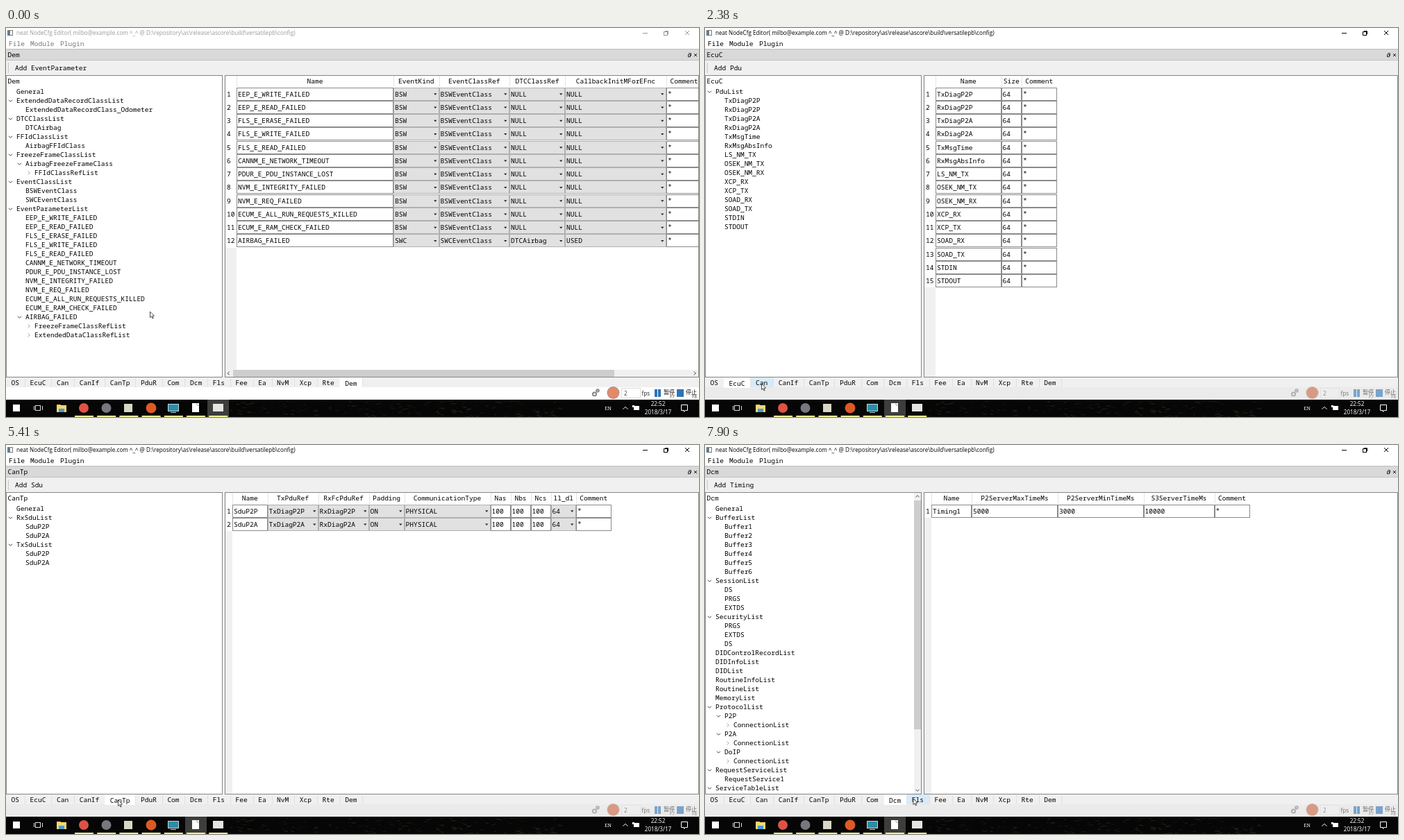
An HTML page with a canvas for the animation above (8 s loop, 998 by 561 pixels).

```html
<!DOCTYPE html>
<html>
<head>
<meta charset="utf-8">
<style>
  html, body { margin: 0; height: 100%; overflow: hidden; background: #fff; }
  canvas { display: block; }
</style>
</head>
<body>
<canvas id="stage" width="998" height="561"></canvas>
<script>
const g = document.getElementById('stage').getContext('2d');
const MONO = '500 9.55px "Noto Sans Mono", monospace';
const SANS = '8.15px "Open Sans", sans-serif';
const CJK = '8px "Noto Sans CJK SC", "Noto Sans CJK", sans-serif';
const TABS = 'OS EcuC Can CanIf CanTp PduR Com Dcm Fls Fee Ea NvM Xcp Rte Dem'.split(' ');
const CHAR = 5.73;
const ROW = 19.25;

const bswEvents = ('EEP_E_WRITE_FAILED EEP_E_READ_FAILED FLS_E_ERASE_FAILED FLS_E_WRITE_FAILED FLS_E_READ_FAILED ' +
  'CANNM_E_NETWORK_TIMEOUT PDUR_E_PDU_INSTANCE_LOST NVM_E_INTEGRITY_FAILED NVM_E_REQ_FAILED ' +
  'ECUM_E_ALL_RUN_REQUESTS_KILLED ECUM_E_RAM_CHECK_FAILED').split(' ');
const pdus = ('TxDiagP2P RxDiagP2P TxDiagP2A RxDiagP2A TxMsgTime RxMsgAbsInfo LS_NM_TX OSEK_NM_TX ' +
  'OSEK_NM_RX XCP_RX XCP_TX SOAD_RX SOAD_TX STDIN STDOUT').split(' ');
const routes = ['DcmP2P,Dcm,TxDiagP2P', 'CanTpP2P,CanTp,RxDiagP2P', 'DcmP2A,Dcm,TxDiagP2A', 'CanTpP2A,CanTp,RxDiagP2A',
  'ComMsgTime,Com,TxMsgTime', 'CanIfMsgAbs,CanIf,RxMsgAbsInfo', 'SOAD_RX,SoAdTp,SOAD_RX', 'SOAD_TX,Dcm,SOAD_TX'];

// Tree: leading spaces give depth, "-" is open, "+" is closed. Columns: name:width, "*" marks a combo box.
const PAGES = {
  Dem: {
    add: 'EventParameter', hscroll: true,
    tree: 'General|-ExtendedDataRecordClassList| ExtendedDataRecordClass_Odometer|-DTCClassList| DTCAirbag|' +
      '-FFIdClassList| AirbagFFIdClass|-FreezeFrameClassList| -AirbagFreezeFrameClass|  +FFIdClassRefList|' +
      '-EventClassList| BSWEventClass| SWCEventClass|-EventParameterList|' + bswEvents.map(e => ' ' + e).join('|') +
      '| -AIRBAG_FAILED|  +FreezeFrameClassRefList|  +ExtendedDataClassRefList',
    cols: 'Name:226 EventKind:65.5* EventClassRef:101.5* DTCClassRef:80* CallbackInitMForEFnc:146* Comment:51',
    rows: [...bswEvents.map(e => e + ',BSW,BSWEventClass,NULL,NULL'), 'AIRBAG_FAILED,SWC,SWCEventClass,DTCAirbag,USED']
  },
  OS: {
    add: 'Resource',
    tree: 'General|-ApplicationModeList| OSDEFAULTAPPMODE|-ApplicationList| OsDefaultApp|-TaskList| SchM_Startup|' +
      ' SchM_BswService| -Task3|  +EventList|-AlarmList| Alarm_BswService| Alarm2|-CounterList| OsClock|' +
      '-ResourceList| RES_SCHEDULER|InternalResourceList',
    cols: 'Name:102 Priority:58 Application:80.5* Comment:50.5',
    rows: ['RES_SCHEDULER,15,']
  },
  EcuC: {
    add: 'Pdu',
    tree: '-PduList|' + pdus.map(p => ' ' + p).join('|'),
    cols: 'Name:94.5 Size:29.5 Comment:50.5',
    rows: pdus.map(p => p + ',64')
  },
  Can: {
    add: 'Controller',
    tree: 'General|-ControllerList| -CAN_CTRL_1|  +HthList|  +HrhList',
    cols: 'Name:94.5 ControllerId:102.5* Comment:50.5',
    rows: ['CAN_CTRL_1,CAN_CTRL_0']
  },
  CanIf: {
    add: 'Channel',
    tree: 'General|-ChannelList| -CANIF_CHL_LS|  +HthList|  +TxPduList|  +HrhList|  +RxPduList',
    cols: 'Name:94.5 ControllerRef:95* Comment:50.5',
    rows: ['CANIF_CHL_LS,CAN_CTRL_1']
  },
  CanTp: {
    add: 'Sdu',
    tree: 'General|-RxSduList| SduP2P| SduP2A|-TxSduList| SduP2P| SduP2A',
    cols: 'Name:50.5 TxPduRef:73* RxFcPduRef:73* Padding:51* CommunicationType:124* Nas:29 Nbs:29 Ncs:29 ll_dl:36.5* Comment:50.5',
    rows: ['P2P', 'P2A'].map(s => `Sdu${s},TxDiag${s},RxDiag${s},ON,PHYSICAL,100,100,100,64`)
  },
  PduR: {
    add: 'Source',
    tree: 'General|-RoutineList|' + routes.map(r => ` -${r.split(',')[0]}|  +DestinationList`).join('|'),
    cols: 'Name:87 Module:51.5* PduRef:94* Comment:51',
    rows: routes
  },
  Com: {
    add: 'IPdu', hscroll: true,
    tree: 'General|-IPduList| -TxMsgTime|  +SignalList| -RxMsgAbsInfo|  +SignalList',
    cols: 'Name:94.5 PduRef:95* Direction:80* FirstTime:73 CycleTime:73 RxNotification:110* TxNotification:110* Comment:51',
    rows: ['TxMsgTime,TxMsgTime,SEND,100,1000,NULL,NULL', 'RxMsgAbsInfo,RxMsgAbsInfo,RECEIVE,100,1000,NULL,NULL']
  },
  Dcm: {
    add: 'Timing', vscroll: true,
    tree: 'General|-BufferList|' + [1, 2, 3, 4, 5, 6].map(i => ' Buffer' + i).join('|') +
      '|-SessionList| DS| PRGS| EXTDS|-SecurityList| PRGS| EXTDS| DS|DIDControlRecordList|DIDInfoList|DIDList|' +
      'RoutineInfoList|RoutineList|MemoryList|-ProtocolList|' +
      ['P2P', 'P2A', 'DoIP'].map(p => ` -${p}|  +ConnectionList`).join('|') +
      '|-RequestServiceList| RequestService1|-ServiceTableList',
    cols: 'Name:58 P2ServerMaxTimeMs:124 P2ServerMinTimeMs:123.5 S3ServerTimeMs:102 Comment:51',
    rows: ['Timing1,5000,3000,10000']
  }
};

// start, page, hovered tab, cursor, window active, menu enabled, click halo
const STEPS = [
  [0, 'Dem', '', [207.5, 409], 0, 0],
  [500, 'Dem', '', null, 0, 0],
  [920, 'Dem', 'OS', [10, 508], 0, 0],
  [1420, 'OS', '', [9.5, 510], 1, 1],
  [1920, 'OS', 'EcuC', [47, 510], 1, 1],
  [2380, 'EcuC', 'Can', [81.5, 513], 1, 1],
  [2900, 'Can', '', [82, 514], 1, 1],
  [3420, 'CanIf', '', [119.5, 511], 1, 1],
  [3900, 'CanIf', 'CanTp', [147.5, 512], 1, 1],
  [4400, 'CanIf', 'CanTp', [147.5, 512], 0, 1],
  [4910, 'CanIf', 'CanTp', [161, 515], 0, 0],
  [5410, 'CanTp', '', [161.5, 512], 1, 1],
  [5920, 'PduR', '', [196.5, 511], 1, 1],
  [6380, 'PduR', 'Com', [243, 508], 1, 1, 1],
  [6930, 'Com', '', [244, 514], 1, 1],
  [7420, 'Dcm', '', [268.5, 511], 1, 1],
  [7900, 'Dcm', 'Fls', [300, 510], 1, 1]
];

function rect(x, y, w, h, fill) {
  g.fillStyle = fill;
  g.fillRect(x, y, w, h);
}
function frame(x, y, w, h, color, fill) {
  if (fill) rect(x, y, w, h, fill);
  g.strokeStyle = color;
  g.lineWidth = 1;
  g.strokeRect(x + .5, y + .5, w - 1, h - 1);
}
function disc(x, y, r, fill) {
  g.fillStyle = fill;
  g.beginPath();
  g.arc(x, y, r, 0, 7);
  g.fill();
}
function line(color, width, ...pts) {
  g.strokeStyle = color;
  g.lineWidth = width;
  g.beginPath();
  for (let i = 0; i < pts.length; i += 2) g.lineTo(pts[i], pts[i + 1]);
  g.stroke();
}
// y is the vertical middle of the capitals
function text(s, x, y, color = '#000', font = MONO, align = 'left') {
  g.font = font;
  g.fillStyle = color;
  g.textAlign = align;
  g.fillText(s, x, y + 3.4);
}
function chevron(x, y, dir, color = '#404040', r = 2.5) {
  const h = r / 2;
  if (dir === 'right') line(color, 1, x - h, y - r, x + h, y, x - h, y + r);
  else if (dir === 'left') line(color, 1, x + h, y - r, x - h, y, x + h, y + r);
  else if (dir === 'up') line(color, 1, x - r, y + h, x, y - h, x + r, y + h);
  else line(color, 1, x - r, y - h, x, y + h, x + r, y - h);
}

function drawTitle(name, active, menu) {
  const ink = active ? '#000' : '#999';
  rect(0, 0, 998, 31, '#fff');
  frame(2, 3, 8, 8, '#777', '#fff');
  rect(3, 4, 3, 6, '#5d7d9c');
  text('neat NodeCfg Editor( milbo@example.com ^_^ @ D:\\repository\\as\\release\\ascore\\build\\versatilepb\\config)',
    15, 7, ink, SANS);
  line(ink, 1, 917, 7.5, 924, 7.5);
  frame(947, 5, 6, 6, ink);
  line(ink, 1, 949, 4.5, 953.5, 4.5, 953.5, 9);
  line(ink, 1, 978, 4, 984, 10);
  line(ink, 1, 984, 4, 978, 10);
  ['File', 'Module', 'Plugin'].forEach((m, i) => text(m, [4, 35, 78][i], 22.5, menu ? '#000' : '#777'));

  rect(0, 31, 998, 16, '#d9d9d9');
  line('#bcbcbc', 1, 0, 30.5, 998, 30.5);
  line('#c4c4c4', 1, 0, 46.5, 998, 46.5);
  text(name, 2.5, 39);
  frame(982, 38, 4, 4, '#333');
  line('#333', 1, 983, 36.5, 986.5, 36.5, 986.5, 40);
  line('#222', 1, 991, 37, 995, 41);
  line('#222', 1, 995, 37, 991, 41);
}

function drawTree(name, page) {
  frame(0, 68, 312, 436, '#868686', '#fff');
  text(name, 2.5, 77);
  page.tree.split('|').forEach((item, i) => {
    const depth = item.search(/\S/), mark = item[depth], y = 92 + 13 * i, x = 15 + 13 * depth;
    if (mark === '-') chevron(x - 8.5, y, 'down');
    if (mark === '+') chevron(x - 8, y, 'right', '#a0a0a0');
    text(item.replace(/^ *[-+]?/, ''), x, y);
  });
  if (page.vscroll) {
    rect(301, 69, 10, 434, '#f0f0f0');
    rect(301, 80, 10, 330, '#cdcdcd');
    chevron(306, 74, 'up', '#505050');
    chevron(306, 498, 'down', '#505050');
  }
}

function drawTable(page) {
  frame(315, 68, 683, 436, '#868686', '#fff');
  g.save();
  g.beginPath();
  g.rect(316, 69, 681, 434);
  g.clip();
  const left = page.rows.length > 9 ? 332 : 326;
  const bottom = Math.floor(86 + ROW * page.rows.length);
  rect(316, bottom, left - 316, 504 - bottom, '#f0f0f0');
  page.rows.forEach((r, i) => text(i + 1, 318, 95.3 + ROW * i));
  let x = left;
  page.cols.split(' ').forEach((col, c) => {
    const [head, size] = col.split(':'), w = parseFloat(size), combo = size.endsWith('*');
    line('#e4e4e4', 1, Math.round(x) + .5, 69, Math.round(x) + .5, 85);
    text(head, x + w / 2, 77, '#000', MONO, 'center');
    page.rows.forEach((row, r) => {
      const y = 95.3 + ROW * r, top = Math.floor(86 + ROW * r);
      const x0 = Math.round(x), x1 = Math.round(x + w);
      frame(x0, top, x1 - x0, 19, combo ? '#b0b0b0' : '#8a8a8a', combo ? '#e1e1e1' : '#fff');
      if (head === 'Comment') text('*', x + 2, y - 1);
      else text(row.split(',')[c], x + 2, y);
      if (combo) {
        g.fillStyle = '#222';
        g.beginPath();
        g.moveTo(x1 - 8, y - 1);
        g.lineTo(x1 - 3.5, y - 1);
        g.lineTo(x1 - 5.75, y + 1.5);
        g.fill();
      }
    });
    x += w;
  });
  if (page.hscroll) {
    rect(316, 493, 681, 11, '#f0f0f0');
    rect(327, 493, 549, 10, '#cdcdcd');
    chevron(320.5, 498, 'left', '#404040');
    chevron(992, 498, 'right', '#404040');
  }
  g.restore();
}

function drawTabs(selected, hover) {
  let x = 0;
  for (const tab of TABS) {
    const w = tab.length * CHAR + 15.5, on = tab === selected;
    if (on || tab === hover) rect(x, 504, w, on ? 15 : 14, on ? '#fff' : '#d8eaf9');
    line('#e0e0e0', 1, Math.round(x + w) + .5, 505, Math.round(x + w) + .5, 518);
    text(tab, x + 7.6, on ? 512.5 : 512);
    x += w;
  }
}

function drawRecorder(on) {
  rect(0, 518, 998, 19, on ? '#fff' : '#ebebeb');
  g.globalAlpha = on ? 1 : .6;
  for (const [x, y, r] of [[847.5, 528, 2.6], [852, 523, 1.8]]) {
    g.strokeStyle = '#888';
    g.lineWidth = 2;
    g.beginPath();
    g.arc(x, y, r, 0, 7);
    g.stroke();
  }
  disc(874.5, 526, 9, '#b98a7c');
  disc(874.5, 526, 8, '#e08a6c');
  frame(886, 519, 28, 15, '#dcdcdc', on ? '#fff' : '#f1f1f1');
  text('2', 890, 526.5, '#444', SANS);
  text('fps', 915.5, 526.5, '#222', SANS);
  rect(934, 521, 4, 11, '#2f73b5');
  rect(939, 521, 4, 11, '#2f73b5');
  rect(966, 521, 10, 11, '#2f73b5');
  text('暂停', 947, 525, '#111', CJK);
  text('停止', 979, 525, '#111', CJK);
  const small = '6.5px "Open Sans", sans-serif';
  text('F7', 956, 531, '#444', small);
  text('F8', 988, 531, '#444', small);
  g.globalAlpha = 1;
}

// Dark foliage showing through the taskbar
function drawFoliage() {
  let seed = 7;
  const random = () => (seed = seed * 16807 % 2147483647) / 2147483647;
  for (let i = 0; i < 220; i++) {
    const x = 322 + 480 * random(), y = 537 + 24 * random(), size = 2 + 6 * random();
    line(`rgba(70, 78, 52, ${.35 * random()})`, 1.5, x, y, x + size, y + size * (random() - .5));
  }
}

function drawTaskbar(active) {
  g.save();
  g.beginPath();
  g.rect(0, 536, 998, 25);
  g.clip();
  rect(0, 536, 998, 25, '#050605');
  drawFoliage();
  g.restore();
  rect(active ? 258 : 290, 536, 31, 25, '#3d3d3b');
  for (let i = 0; i < 7; i++) rect(99 + 32.2 * i, 559, 27, 2, '#f4ee8e');

  rect(10, 543, 10, 10, '#fff');
  frame(42, 544, 8, 8, '#ddd');
  line('#ddd', 1, 40.5, 545, 40.5, 551);
  line('#ddd', 1, 52.5, 545, 52.5, 551);
  rect(73, 543, 6, 3, '#e8b84a');
  rect(73, 544, 14, 10, '#f6d671');
  rect(76, 549, 8, 5, '#4a9bd4');
  disc(112, 548, 7, '#de5246');
  disc(144.5, 548, 7, '#77777f');
  rect(170, 542, 12, 12, '#d8d6c4');
  disc(209, 548, 7.5, '#dd5a24');
  frame(233, 542, 16, 11, '#c9d5da', '#2c8da8');
  rect(237, 554, 8, 1, '#c9d5da');
  rect(268, 541, 10, 13, '#fff');
  line('#aaa', 1, 275, 541, 275, 544, 278, 544);
  rect(298, 542, 15, 11, '#e4e4e0');

  text('EN', 867, 547.5, '#fff', '7px "Noto Serif", serif', 'center');
  chevron(892, 548, 'up', '#fff', 3.5);
  frame(904, 545, 8, 6, '#fff', '#fff');
  rect(902, 544, 3, 3, '#fff');
  text('22:52', 939, 542, '#fff', SANS, 'center');
  text('2018/3/17', 939, 553.5, '#fff', SANS, 'center');
  line('#fff', 1, 972.5, 543.5, 981.5, 543.5, 981.5, 551.5, 978, 551.5, 976.5, 553.5, 976.5, 551.5, 972.5, 551.5, 972.5, 543.5);
}

function drawCursor(x, y, halo) {
  if (halo) disc(x + 1, y + 2, 6, 'rgba(240,232,70,.75)');
  g.beginPath();
  for (const [dx, dy] of [[0, 0], [0, 8.5], [2, 6.8], [3.4, 10], [4.7, 9.4], [3.4, 6.3], [6, 6.1]]) g.lineTo(x + dx, y + dy);
  g.closePath();
  g.fillStyle = '#fff';
  g.fill();
  g.strokeStyle = '#222';
  g.lineWidth = .8;
  g.stroke();
}

function draw() {
  const t = performance.now() % 8000;
  const [, name, hover, cursor, active, menu, halo] = STEPS.findLast(s => s[0] <= t);
  const page = PAGES[name];
  rect(0, 0, 998, 561, '#f0f0f0');
  drawTitle(name, active, menu);
  line('#c8c8c8', 1, 3.5, 50, 3.5, 65);
  text('Add ' + page.add, 13, 57.5);
  drawTree(name, page);
  drawTable(page);
  drawRecorder(!active);
  drawTabs(name, hover);
  drawTaskbar(active);
  if (cursor) drawCursor(...cursor, halo);
  requestAnimationFrame(draw);
}
draw();
</script>
</body>
</html>
```
